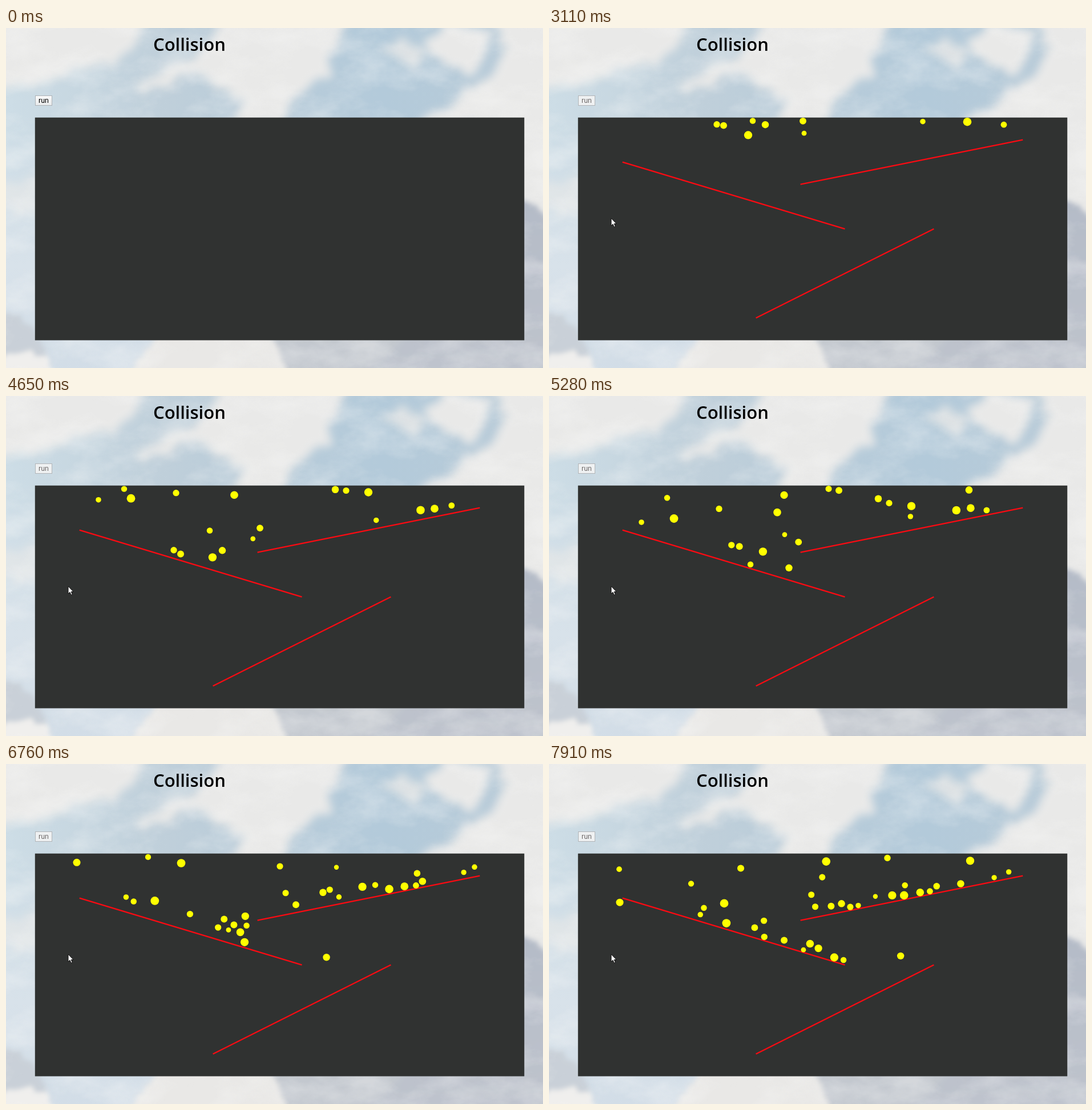
Recreate the animation shown at these times as an HTML page with a canvas. Size 941 by 595 pixels, loop 8000 ms.

```html
<!DOCTYPE html>
<html lang="en">
<head>
<meta charset="utf-8">
<title>Collision</title>
<style>
  html, body { margin: 0; width: 100%; height: 100%; overflow: hidden; }
  body { position: relative; background: #c3d2df; }
  svg, canvas { position: absolute; left: 0; top: 0; }
  h1 {
    position: absolute; left: 258px; top: 6px; margin: 0;
    font: 600 31px/44px "Open Sans", "Noto Sans", sans-serif; color: #000;
  }
  button {
    position: absolute; left: 51px; top: 118px; width: 30px; height: 18px;
    box-sizing: border-box; margin: 0; padding: 0;
    border: 1px solid #aeb2b6; border-radius: 0;
    background: linear-gradient(#fafafa, #e9ebec);
    font: 12.5px/16px Roboto, sans-serif; color: #000;
  }
  button.hover { border-color: #777b80; background: linear-gradient(#fff, #f1f2f3); }
  button.off { border-color: #b2b5b8; background: #eff1f2; color: #6f6b6b; }
</style>
</head>
<body>
<svg width="941" height="595" viewBox="0 0 941 595">
  <defs>
    <linearGradient id="sky" x2="1" y2="0">
      <stop offset="0" stop-color="#cddde6"/>
      <stop offset=".3" stop-color="#bfcfda"/>
      <stop offset=".7" stop-color="#b3cada"/>
      <stop offset="1" stop-color="#b9cbd8"/>
    </linearGradient>
    <linearGradient id="low" x2="0" y2="1">
      <stop offset=".25" stop-color="#d8e2ea" stop-opacity="0"/>
      <stop offset=".7" stop-color="#d8e2ea"/>
      <stop offset="1" stop-color="#d2dde7"/>
    </linearGradient>
    <linearGradient id="storm" x2="0" y2="1">
      <stop offset="0" stop-color="#b4bbc7"/>
      <stop offset="1" stop-color="#bfc4cd"/>
    </linearGradient>
    <filter id="puff" x="-20%" y="-20%" width="140%" height="140%">
      <feTurbulence type="fractalNoise" baseFrequency=".03" numOctaves="5" seed="7"/>
      <feDisplacementMap in="SourceGraphic" scale="34" xChannelSelector="R" yChannelSelector="G"/>
      <feGaussianBlur stdDeviation="8"/>
    </filter>
    <filter id="edge" x="-20%" y="-20%" width="140%" height="140%">
      <feTurbulence type="fractalNoise" baseFrequency=".05" numOctaves="4" seed="3"/>
      <feDisplacementMap in="SourceGraphic" scale="16" xChannelSelector="R" yChannelSelector="G"/>
      <feGaussianBlur stdDeviation="4"/>
    </filter>
    <filter id="haze" x="0" y="0" width="100%" height="100%">
      <feTurbulence type="fractalNoise" baseFrequency=".012 .02" numOctaves="5" seed="11"/>
      <feColorMatrix values="0 0 0 0 .96  0 0 0 0 .96  0 0 0 0 .95  2.4 0 0 0 -.95"/>
    </filter>
  </defs>
  <rect width="941" height="595" fill="url(#sky)"/>
  <rect width="941" height="595" fill="url(#low)"/>
  <g filter="url(#puff)" fill="#e9e9e8">
    <path d="M-30-30H242L235 28 190 58 120 74 60 94-30 112Z"/>
    <path d="M225 102L290 65 350 40 390-30H608L570 45 566 85 540 96 500 125 480 170H390L415 130 368 110 350 82 290 95 250 115Z"/>
    <path d="M650 40L690 22 736 40 720 64 690 58Z" opacity=".8"/>
    <path d="M735 25L770-10 852 8 842 50 815 84 780 66 750 45Z"/>
    <path d="M856-30H980V340H880V170H715L790 125 815 100 850 80 870 40Z"/>
    <path d="M-30 272L60 262V322L25 328-30 312Z" opacity=".6"/>
  </g>
  <g filter="url(#edge)">
    <path d="M900 298L928 308 960 345V620H470V530H900Z" fill="url(#storm)"/>
    <path d="M470 535H720L600 620H470Z" fill="#c6cad0" opacity=".7"/>
    <path d="M214 610L240 572 268 535H460L480 568 490 610Z" fill="#e9e8e6"/>
    <path d="M-20 494L28 506 50 530 66 560 82 610H-20Z" fill="#c9d0d8"/>
    <path d="M-20 578L20 570 42 566 74 576 84 610H-20Z" fill="#f0efed"/>
  </g>
  <rect width="941" height="595" filter="url(#haze)" opacity=".3"/>
</svg>
<h1>Collision</h1>
<button type="button" id="run">run</button>
<canvas id="view" width="941" height="595"></canvas>
<script>
const ctx = document.getElementById('view').getContext('2d');
const run = document.getElementById('run');
const LOOP = 8, HOVER = 1.7, START = 2.15;
const GRAVITY = 52, BOUNCE = 0.55, STEP = 1 / 200;
const LEFT = 50.8, TOP = 156.7, SCALE = 0.7795;

// The world is 1100 x 500 units, shown scaled down.
const toX = x => LEFT + x * SCALE;
const toY = y => TOP + y * SCALE;
const BOX = [LEFT, TOP, 1100 * SCALE, 500 * SCALE];
const LINES = [[100, 100, 600, 250], [500, 150, 1000, 50], [400, 450, 800, 250]]
  .map(([x1, y1, x2, y2]) => {
    const a = [toX(x1), toY(y1)], b = [toX(x2), toY(y2)];
    const len = Math.hypot(b[0] - a[0], b[1] - a[1]);
    return { a, b, len, dx: (b[0] - a[0]) / len, dy: (b[1] - a[1]) / len };
  });

// When and where each ball is let go.
const DROPS = [
  [2.16, 349], [2.17, 447], [2.56, 306], [2.59, 797], [2.62, 294], [2.62, 379],
  [2.82, 655], [2.97, 357], [3.03, 445], [3.03, 733], [3.15, 756], [3.77, 162],
  [3.89, 219], [4.04, 400], [4.12, 298], [4.23, 635], [4.3, 596], [4.48, 577],
  [4.49, 207], [4.66, 412], [4.97, 508], [5.05, 736], [5.2, 490], [5.34, 807],
  [5.38, 647], [5.6, 724], [5.89, 579], [5.91, 821], [5.96, 480], [6.16, 307],
  [6.17, 124], [6.56, 249], [6.77, 480], [6.98, 123], [7.04, 336], [7.37, 485],
  [7.45, 738], [7.63, 593]
];

let balls, clock;

function random(seed) {
  const s = Math.sin(seed * 12.9898) * 43758.5453;
  return s - Math.floor(s);
}

function reset() {
  clock = START;
  balls = DROPS.map(([start, x], i) => {
    const r = 4.2 + 3.2 * random(i + 1);
    return { start, x, y: TOP + r, vx: 0, vy: 0, r };
  });
}

// Lines are solid from above; the normal (dy, -dx) points up.
function hitLine(ball, { a, len, dx, dy }) {
  const px = ball.x - a[0], py = ball.y - a[1];
  const along = px * dx + py * dy;
  const gap = px * dy - py * dx;
  if (along < 0 || along > len || gap > ball.r || gap < -ball.r / 2) return;
  ball.x += (ball.r - gap) * dy;
  ball.y -= (ball.r - gap) * dx;
  const speed = ball.vx * dy - ball.vy * dx;
  if (speed >= 0) return;
  ball.vx -= (1 + BOUNCE) * speed * dy;
  ball.vy += (1 + BOUNCE) * speed * dx;
}

function hitBall(p, q) {
  const dx = q.x - p.x, dy = q.y - p.y;
  const dist = Math.hypot(dx, dy) || 1, overlap = p.r + q.r - dist;
  if (overlap <= 0) return;
  const nx = dx / dist, ny = dy / dist;
  const share = q.r ** 2 / (p.r ** 2 + q.r ** 2);
  const speed = Math.min(0, (q.vx - p.vx) * nx + (q.vy - p.vy) * ny);
  const push = (1 + BOUNCE) * speed;
  for (const [ball, part] of [[p, share], [q, share - 1]]) {
    ball.x -= overlap * part * nx;
    ball.y -= overlap * part * ny;
    ball.vx += push * part * nx;
    ball.vy += push * part * ny;
  }
}

function step() {
  clock += STEP;
  const live = balls.filter(ball => ball.start <= clock);
  for (const ball of live) {
    ball.vy += GRAVITY * STEP;
    ball.x += ball.vx * STEP;
    ball.y += ball.vy * STEP;
  }
  live.forEach((p, i) => live.slice(i + 1).forEach(q => hitBall(p, q)));
  for (const ball of live) LINES.forEach(line => hitLine(ball, line));
}

function drawScene() {
  ctx.save();
  ctx.beginPath();
  ctx.rect(...BOX);
  ctx.clip();
  ctx.strokeStyle = '#fb0a12';
  ctx.lineWidth = 3 * SCALE;
  for (const { a, b } of LINES) {
    ctx.beginPath();
    ctx.moveTo(...a);
    ctx.lineTo(...b);
    ctx.stroke();
  }
  ctx.fillStyle = '#ff0';
  for (const ball of balls) {
    if (ball.start > clock) continue;
    ctx.beginPath();
    ctx.arc(ball.x, ball.y, ball.r, 0, 2 * Math.PI);
    ctx.fill();
  }
  ctx.restore();
}

const POINTER = [
  [0.28, 812, 576], [0.82, 440, 226], [1.01, 302, 334],
  [1.85, 65.5, 127], [2.2, 65.5, 127], [3.05, 109, 333]
];
const arrow = new Path2D('M0 0V13L3 10.3 5.2 15.2 7.3 14.3 5.2 9.5H9Z');

function drawPointer(t) {
  if (t < POINTER[0][0]) return;
  const next = POINTER.findIndex(p => p[0] > t);
  const b = POINTER.at(next), a = next < 0 ? b : POINTER[next - 1];
  const u = a === b ? 0 : (t - a[0]) / (b[0] - a[0]);
  const ease = u * u * (3 - 2 * u);
  ctx.save();
  ctx.translate(a[1] + (b[1] - a[1]) * ease, a[2] + (b[2] - a[2]) * ease);
  ctx.fillStyle = '#fff';
  ctx.strokeStyle = '#111';
  ctx.fill(arrow);
  ctx.stroke(arrow);
  ctx.restore();
}

function frame() {
  const t = performance.now() / 1000 % LOOP;
  if (t < clock) reset();
  while (clock + STEP <= t) step();
  run.className = t >= START ? 'off' : t >= HOVER ? 'hover' : '';
  ctx.clearRect(0, 0, 941, 595);
  ctx.fillStyle = '#303231';
  ctx.fillRect(...BOX);
  if (t >= START) drawScene();
  drawPointer(t);
  requestAnimationFrame(frame);
}
reset();
frame();
</script>
</body>
</html>
```
